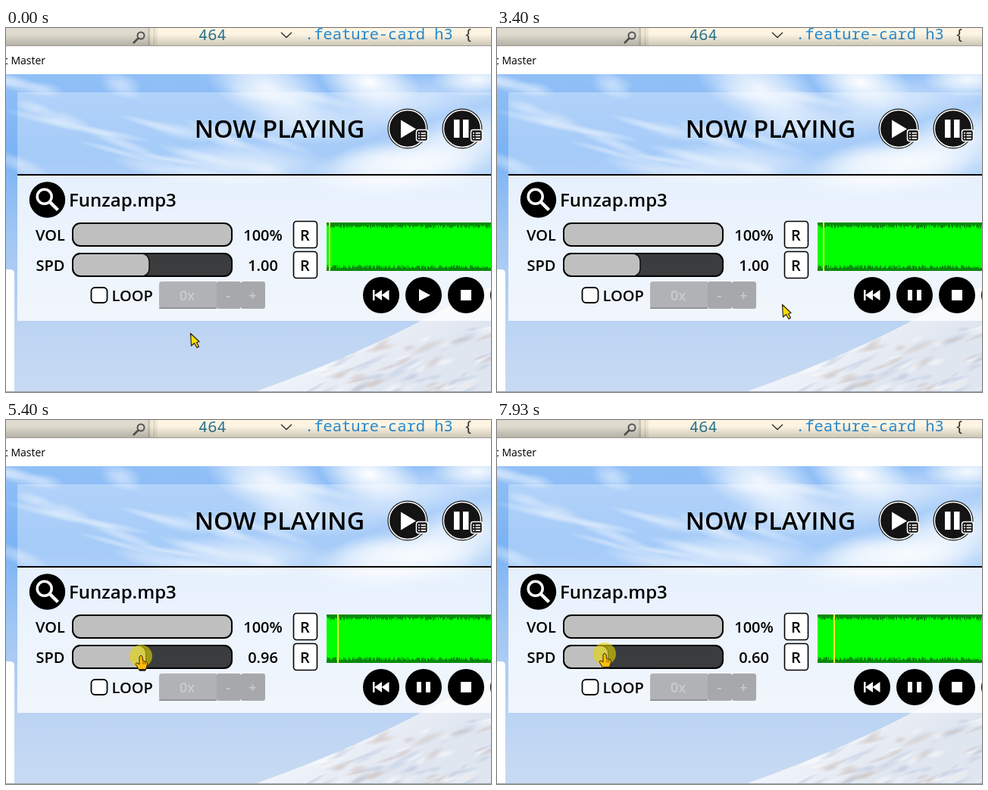
Recreate the animation shown at these times as an HTML page with a canvas. Size 640 by 481 pixels, loop 8000 ms.

```html
<!DOCTYPE html>
<html lang="en">
<head>
<meta charset="utf-8">
<title>Audio player demo</title>
<style>
html, body { margin: 0; width: 100%; height: 100%; overflow: hidden; }
canvas { display: block; width: 640px; height: 481px; }
</style>
</head>
<body>
<canvas id="stage" width="640" height="481"></canvas>
<script>
const W = 640, H = 481, LOOP = 8000;
const MOVE_START = 1500, STEP = 126.1, STEP_SLACK = 16;
const HOVER_PLAY = 4, PLAY = 6, LEAVE_PLAY = 10, HOVER_SPEED = 18, PRESS = 27, DRAG = 29;
const UI = '"Open Sans", sans-serif';
const MONO = '"Noto Sans Mono", monospace';

// Pointer stops between which it glides
const STOPS = [
  { step: -1, x: 243, y: 403 },
  { step: 3, x: 541, y: 376 },
  { step: HOVER_PLAY, x: 550, y: 363 },
  { step: 8, x: 550, y: 364 },
  { step: LEAVE_PLAY, x: 534, y: 383 },
  { step: 12, x: 484, y: 403 },
  { step: 15, x: 376, y: 365 },
  { step: 20, x: 202, y: 306 },
  { step: 23, x: 177, y: 317 },
  { step: DRAG, x: 190, y: 312 },
  { step: 44, x: 139, y: 308, power: 1.9 },
  { step: 52, x: 142, y: 308 }
];

const stage = document.getElementById('stage').getContext('2d');
const backdrop = document.createElement('canvas');
backdrop.width = W;
backdrop.height = H;
let g = backdrop.getContext('2d');

const lerp = (a, b, u) => a + (b - a) * u;
const easeOut = (u, power) => 1 - (1 - u) ** power;
const clamp = (v, low, high) => Math.max(low, Math.min(high, v));

function seeded(seed) {
  return () => (seed = (seed * 16807) % 2147483647) / 2147483647;
}

function rect(x, y, w, h, color) {
  g.fillStyle = color;
  g.fillRect(x, y, w, h);
}

function round(x, y, w, h, r, fill, stroke, lineWidth = 2) {
  g.beginPath();
  g.roundRect(x, y, w, h, r);
  if (fill) { g.fillStyle = fill; g.fill(); }
  if (stroke) { g.strokeStyle = stroke; g.lineWidth = lineWidth; g.stroke(); }
}

function circle(x, y, r, fill, stroke, lineWidth) {
  round(x - r, y - r, 2 * r, 2 * r, r, fill, stroke, lineWidth);
}

function poly(points, fill, stroke, lineWidth = 1) {
  g.beginPath();
  points.forEach(([x, y]) => g.lineTo(x, y));
  if (fill) { g.closePath(); g.fillStyle = fill; g.fill(); }
  if (stroke) { g.strokeStyle = stroke; g.lineWidth = lineWidth; g.stroke(); }
}

// Horizontal triangle; a negative width points left
function triangle(x, y, w, h, color) {
  poly([[x, y - h / 2], [x + w, y], [x, y + h / 2]], color);
}

function pauseBars(x, y, w, gap, h) {
  rect(x, y, w, h, '#fff');
  rect(x + w + gap, y, w, h, '#fff');
}

function text(str, x, y, size, { color = '#000', weight = 600, align = 'left', family = UI } = {}) {
  g.font = `${weight} ${size}px ${family}`;
  g.fillStyle = color;
  g.textAlign = align;
  g.fillText(str, x, y);
}

function verticalFade(y0, y1, ...colors) {
  const fade = g.createLinearGradient(0, y0, 0, y1);
  colors.forEach((color, i) => fade.addColorStop(i / (colors.length - 1), color));
  return fade;
}

function blob(x, y, rx, ry, alpha, angle = 0, rgb = '255,255,255') {
  g.save();
  g.translate(x, y);
  g.rotate(angle);
  g.scale(rx, ry);
  const fade = g.createRadialGradient(0, 0, 0, 0, 0, 1);
  fade.addColorStop(0, `rgba(${rgb},${alpha})`);
  fade.addColorStop(0.5, `rgba(${rgb},${alpha * 0.6})`);
  fade.addColorStop(1, `rgba(${rgb},0)`);
  g.fillStyle = fade;
  g.fillRect(-1, -1, 2, 2);
  g.restore();
}

function drawSky() {
  rect(0, 61, W, H - 61, verticalFade(61, H, '#92c0f7', '#7ab2f4', '#9fc6f4', '#b9d2f3', '#c9dbf3'));

  const random = seeded(23);
  for (let i = 0; i < 26; i++) {
    blob(random() * 420, 65 + random() * 130, 25 + random() * 60, 4 + random() * 9, 0.4, 0.1 + random() * 0.3);
  }
  for (let i = 0; i < 14; i++) {
    blob(380 + random() * 260, 80 + random() * 110, 50 + random() * 60, 20 + random() * 20, 0.3, -0.4 + random() * 0.5);
  }
  blob(345, 78, 85, 42, 0.85, 0.3);
  blob(480, 72, 68, 36, 1, 0.2);
  blob(622, 68, 60, 24, 0.9);
  blob(540, 178, 150, 40, 0.6, -0.15);
  blob(310, 180, 120, 30, 0.6);
}

function drawMountain() {
  g.save();
  g.beginPath();
  g.moveTo(328, H);
  g.quadraticCurveTo(470, 430, 560, 380);
  g.lineTo(W, 342);
  g.lineTo(W, H);
  g.clip();
  const snow = g.createLinearGradient(440, 400, 500, H);
  snow.addColorStop(0, '#f1f4fa');
  snow.addColorStop(1, '#e0e6f0');
  rect(328, 340, W, H, snow);
  const random = seeded(41);
  for (let i = 0; i < 90; i++) {
    const x = 400 + random() * 250;
    const y = 395 + random() * 90;
    const tone = ['255,255,255', '205,192,188', '188,202,224'][i % 3];
    blob(x, y, 8 + random() * 22, 2 + random() * 4, 0.55, -0.6 + random() * 0.4, tone);
  }
  g.restore();
}

function drawEditorStrip() {
  rect(0, 0, W, 24, '#fdf5e2');
  rect(0, 0, 187, 23, '#dedacd');
  rect(187, 0, 3, 23, '#c9c4b7');
  rect(190, 0, 10, 23, '#eee7d4');
  rect(195, 0, 1, 23, '#d3cbb8');
  circle(178, 10, 4.5, null, '#555');
  poly([[174.5, 13.5], [168, 20]], null, '#555', 2.5);
  text('464', 254, 16, 20.4, { color: '#2b7391', weight: 500, family: MONO });
  poly([[363, 6], [370, 12.5], [377, 6]], null, '#333', 1.5);
  text('.feature-card h3', 394, 15, 20.4, { color: '#268bd2', weight: 500, family: MONO });
  text('{', 604, 15, 20.4, { color: '#333', weight: 500, family: MONO });
  rect(0, 8, W, 16, verticalFade(8, 24, 'rgba(0,0,0,0)', 'rgba(0,0,0,.2)'));
  rect(0, 23, W, 1, '#9f9b91');
}

function drawPanels() {
  rect(0, 24, W, 37, '#fff');
  text('c Master', 52, 48, 14, { weight: 400, align: 'right' });
  rect(15, 85, 625, 108, 'rgba(255,255,255,.32)');
  rect(15, 195, 625, 192, 'rgba(255,255,255,.8)');
  rect(15, 193, 625, 2, '#000');
  round(-10, 319, 21, 180, 5, '#fff');
}

function drawPlaylistButton(x, drawIcon) {
  circle(x, 133, 26.5, '#141414');
  circle(x, 133, 24.6, null, '#fff', 1.5);
  drawIcon();
  round(x + 11.5, 134.5, 15, 15, 3, '#141414', '#fff', 1.5);
  for (let y = 138; y < 148; y += 3.5) {
    rect(x + 14, y, 2, 1.7, '#fff');
    rect(x + 17.5, y, 6.5, 1.7, '#fff');
  }
}

function drawHeader() {
  text('NOW PLAYING', 361, 145, 32.4, { align: 'center' });
  drawPlaylistButton(530, () => triangle(521, 133.5, 20, 24, '#fff'));
  drawPlaylistButton(602, () => pauseBars(591, 121, 7.5, 4.5, 24));
}

function drawControls() {
  circle(54.5, 227, 23.7, '#000');
  circle(50.7, 222.7, 9.5, null, '#fff', 3.5);
  poly([[57.5, 229.5], [68.5, 240.5]], null, '#fff', 4.5);
  text('Funzap.mp3', 83, 236, 24);

  const centered = { align: 'center' };
  text('VOL', 58.5, 281, 20, centered);
  text('SPD', 58.5, 321, 20, centered);
  round(88, 258, 210, 30, 10, '#bfbfbf', '#000');
  text('100%', 339, 281, 20, centered);
  for (const y of [255.5, 295.5]) {
    round(379.5, y, 31, 35, 4, '#fff', '#000', 1.6);
    text('R', 394.5, y + 25.5, 20, centered);
  }

  round(112.5, 343, 21, 20, 5, '#fff', '#000', 1.8);
  text('LOOP', 139.5, 361, 20);
  round(202, 335, 76, 36, [4, 0, 0, 4], '#b1b2b6');
  rect(202, 369.5, 76, 1.5, '#85878b');
  round(278, 335, 32, 36, 3, '#a6a8ab');
  round(310, 335, 32, 36, 3, '#a6a8ab');
  const faded = { color: '#cacbcf', align: 'center' };
  text('0x', 239, 360, 18, faded);
  text('-', 293.5, 360, 18, faded);
  text('+', 325.5, 360, 18, faded);
}

function drawWaveform() {
  rect(423, 257, 217, 64, '#078a0b');
  const random = seeded(907);
  for (let x = 423; x < W; x++) {
    const top = 260 + random() * 5;
    const bottom = 318 - random() * 5;
    rect(x, top, 1, bottom - top, '#00ff00');
  }
}

function drawTransport() {
  for (const x of [495, 607, 663]) circle(x, 353, 24, '#000');
  rect(484, 346, 2.5, 14, '#fff');
  triangle(496, 353, -10, 14, '#fff');
  triangle(505.5, 353, -10, 14, '#fff');
  rect(600, 346, 14, 14, '#fff');
}

function drawBackdrop() {
  drawSky();
  drawMountain();
  drawEditorStrip();
  drawPanels();
  drawHeader();
  drawControls();
  drawWaveform();
  drawTransport();
  rect(0, 480, W, 1, '#9da5ae');
}

function pointerAt(step) {
  const i = Math.max(1, STOPS.findIndex(stop => stop.step >= step));
  const a = STOPS[i - 1], b = STOPS[i];
  const u = easeOut((step - a.step) / (b.step - a.step), b.power || 1);
  return { x: Math.round(lerp(a.x, b.x, u)), y: Math.round(lerp(a.y, b.y, u)) };
}

function playheadAt(step) {
  return Math.round(426 + 18 * easeOut(clamp((step - PLAY) / 45, 0, 1), 1.25));
}

function drawSpeed(speed) {
  round(88, 298, 210, 30, 10, '#3b3c3e');
  const end = 189 - (1 - speed) * 105;
  round(88, 298, end - 88, 30, 10, '#bfbfbf', '#111', 1.5);
  round(88, 298, 210, 30, 10, null, '#000');
  text(speed.toFixed(2), 339, 321, 20, { align: 'center' });
}

function drawPlayButton(playing) {
  circle(551, 353, 24, '#000');
  if (playing) pauseBars(542, 346, 6, 6, 14);
  else triangle(545, 353, 15, 16, '#fff');
}

function drawArrow() {
  g.lineJoin = 'round';
  poly([[0.5, 0.5], [1.5, 17], [5.5, 13.5], [9, 19.5], [11.5, 18], [8.5, 12.5], [12, 11.5], [0.5, 0.5]],
    '#ffdc00', '#2a2410', 1.2);
}

function drawHand() {
  g.beginPath();
  g.moveTo(-2, 12);
  g.lineTo(-2, 2);
  g.quadraticCurveTo(0, -1.5, 2, 2);
  g.lineTo(2.5, 7);
  g.lineTo(7, 8.5);
  g.quadraticCurveTo(9, 9, 8.5, 12);
  g.lineTo(6, 20);
  g.lineTo(-2, 20);
  g.lineTo(-7, 11.5);
  g.quadraticCurveTo(-6, 8.5, -2, 12);
  g.closePath();
  g.fillStyle = '#ffbd08';
  g.fill();
  g.strokeStyle = '#33240a';
  g.lineWidth = 1;
  g.stroke();
  for (const x of [3, 5.7]) poly([[x, 8.5], [x, 12]], null, '#6b4a00');
  rect(-2, 18, 8, 2.5, '#241a08');
}

function render(now) {
  const t = now % LOOP;
  const step = t < MOVE_START ? -1 : Math.floor((t - MOVE_START + STEP_SLACK) / STEP);
  const { x, y } = pointerAt(step);
  const speed = step < DRAG ? 1 : Math.min(1, 1 + (x - 182) / 100);
  const onPlay = step >= HOVER_PLAY && step < LEAVE_PLAY;
  const pressed = step === PLAY - 1 || step >= PRESS;

  g.drawImage(backdrop, 0, 0);
  drawSpeed(speed);
  drawPlayButton(step >= PLAY);
  rect(playheadAt(step), 257, 2, 64, '#ffe92c');
  if (pressed) circle(x, y + 1, 15, 'rgba(230,215,0,.6)');
  g.save();
  g.translate(x, y);
  if (onPlay || step >= HOVER_SPEED) drawHand();
  else drawArrow();
  g.restore();
}

drawBackdrop();
g = stage;

function tick(now) {
  render(now);
  requestAnimationFrame(tick);
}
requestAnimationFrame(tick);
</script>
</body>
</html>
```
